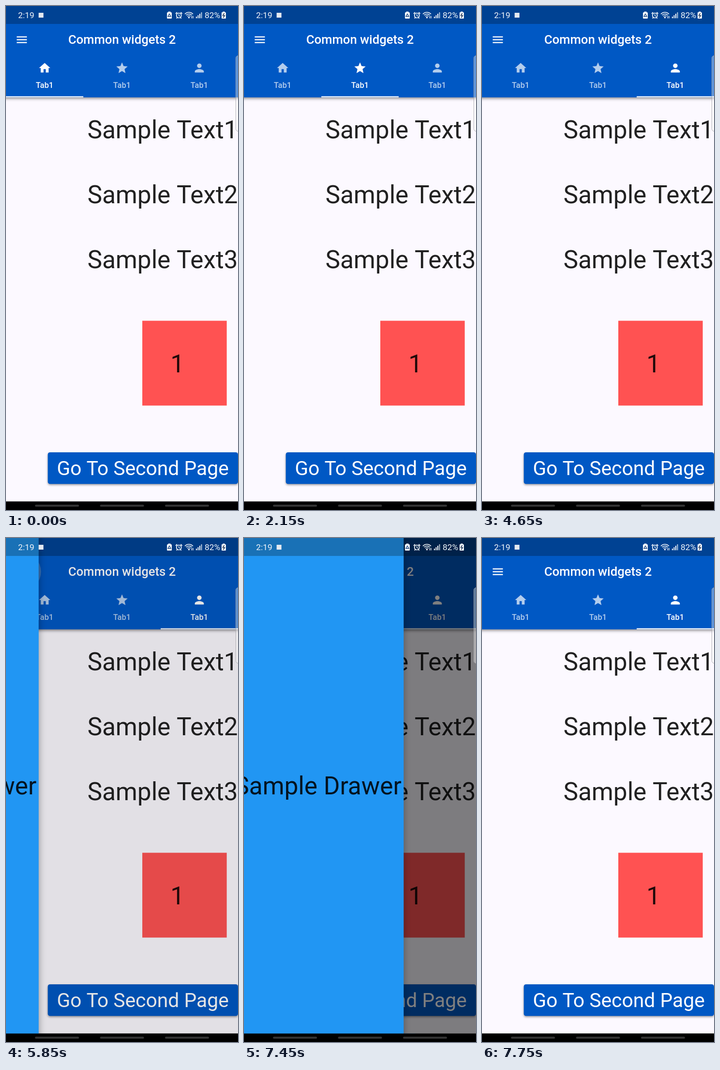
An HTML page with a canvas for the animation above (8 s loop, 480 by 1040 pixels).

```html
<!DOCTYPE html>
<html lang="en">
<head>
<meta charset="utf-8">
<title>Common widgets 2</title>
<style>
html, body { margin: 0; width: 100%; height: 100%; overflow: hidden; background: #000; }
canvas { display: block; width: 480px; height: 1040px; }
</style>
</head>
<body>
<canvas id="stage" width="480" height="1040"></canvas>
<script>
const ctx = document.getElementById('stage').getContext('2d');
const W = 480, LOOP = 8000, STEP = 50;
const DP = 480 / 411.43;
const BAR = 188.6, NAV = 1022.5, DRAWER = 304 * DP;
const BLUE = '#0058c4', INK = 'rgba(0,0,0,.87)', BIG = 44 * DP;

const ICONS = [
  'M10 20v-6h4v6h5v-8h3L12 3 2 12h3v8z',
  'M12 17.27L18.18 21l-1.64-7.03L22 9.24l-7.19-.61L12 2 9.19 8.63 2 9.24l5.46 4.73L5.82 21z',
  'M12 12c2.21 0 4-1.79 4-4s-1.79-4-4-4-4 1.79-4 4 1.79 4 4 4zm0 2c-2.67 0-8 1.34-8 4v2h16v-2c0-2.66-5.33-4-8-4z'
].map(d => new Path2D(d));

const clamp = (v, a = 0, b = 1) => Math.min(b, Math.max(a, v));
const white = a => `rgba(255,255,255,${a})`;

function rect(x, y, w, h, fill, r = 0) {
  ctx.fillStyle = fill;
  ctx.beginPath();
  ctx.roundRect(x, y, w, h, r);
  ctx.fill();
}

function disc(x, y, r, fill) {
  ctx.fillStyle = fill;
  ctx.beginPath();
  ctx.arc(x, y, r, 0, 7);
  ctx.fill();
}

function line(points, color, width) {
  ctx.strokeStyle = color;
  ctx.lineWidth = width;
  ctx.beginPath();
  points.forEach(([x, y], i) => i ? ctx.lineTo(x, y) : ctx.moveTo(x, y));
  ctx.stroke();
}

function text(str, x, y, size, fill, weight = 400, align = 'left') {
  ctx.font = `${weight} ${size}px Roboto, sans-serif`;
  ctx.textAlign = align;
  ctx.fillStyle = fill;
  ctx.fillText(str, x, y);
}

function shadowed(alpha, blur, dy, draw) {
  ctx.save();
  ctx.shadowColor = `rgba(0,0,0,${alpha})`;
  ctx.shadowBlur = blur;
  ctx.shadowOffsetY = dy;
  draw();
  ctx.restore();
}

// cubic-bezier(.25, .1, .25, 1), solved by bisection
function ease(x) {
  if (x <= 0 || x >= 1) return clamp(x);
  const curve = (a, b, s) => 3 * a * s * (1 - s) ** 2 + 3 * b * s * s * (1 - s) + s ** 3;
  let lo = 0, hi = 1;
  for (let i = 0; i < 24; i++) {
    const mid = (lo + hi) / 2;
    if (curve(.25, .25, mid) < x) lo = mid; else hi = mid;
  }
  return curve(.1, 1, lo);
}

// Critically damped spring falling from 1 to just below 0
function spring(ms) {
  const w = Math.sqrt(500), s = ms / 1000;
  return clamp((1.01 + (1.01 * w - 1) * s) * Math.exp(-w * s) - .01);
}

const tabAt = t => ease((t - 1740) / 340) + ease((t - 3440) / 340);

function drawerAt(t) {
  if (t < 5850) return 0;
  if (t < 7450) return 1 - spring(33.5 + (t - 5850) * 1.17);
  return spring(17 + (t - 7450) * 1.17);
}

function content() {
  rect(0, 0, W, NAV, '#fcf9ff');
  [273, 407, 540.5].forEach((y, i) => text('Sample Text' + (i + 1), 168.4, y, BIG, INK));
  rect(282, 649.5, 174.7, 175, '#ff5252');
  text('1', 340.3, 755.5, BIG, INK);
  shadowed(.4, 4, 2, () => rect(86.5, 921, 393.5, 65.3, BLUE, 4.67));
  text('Go To Second Page', 105.2, 967.7, 35 * DP, '#fff');
}

function ripple(index, age) {
  if (age < 0 || age >= 300) return;
  ctx.save();
  ctx.beginPath();
  ctx.rect(index * 160, 102.5, 160, BAR - 102.5);
  ctx.clip();
  disc(index * 160 + 80, 145, 30 + age * .6, `rgba(200,200,200,${.22 * (1 - age / 300)})`);
  ctx.restore();
}

function appBar(t) {
  shadowed(.45, 6, 2, () => rect(-10, 0, W + 20, BAR, BLUE));
  if (t >= 5850 && t < 6050) disc(32.5, 69.5, 40, 'rgba(200,200,200,.3)');
  for (const dy of [-5.83, 0, 5.83]) rect(22.2, 69.6 + dy - 1.17, 21, 2.33, '#fff');
  text('Common widgets 2', 240, 78, 22 * DP, '#fff', 500, 'center');

  ripple(1, t - 1750);
  ripple(2, t - 3450);
  const pos = tabAt(t);
  ICONS.forEach((icon, i) => {
    const color = white(.7 + .3 * clamp(1 - Math.abs(pos - i)));
    const x = 80 + i * 160;
    ctx.save();
    ctx.translate(x - 14, 114);
    ctx.scale(DP, DP);
    ctx.fillStyle = color;
    ctx.fill(icon);
    ctx.restore();
    ctx.letterSpacing = '.12px';
    text('Tab1', x, 169.3, 14 * DP, color, 500, 'center');
    ctx.letterSpacing = '0px';
  });
  rect(pos * 160, BAR - 2.33, 160, 2.33, '#fff');
}

function drawer(open) {
  if (open <= 0) return;
  rect(0, 0, W, NAV, `rgba(0,0,0,${.54 * open})`);
  const x = (open - 1) * DRAWER;
  shadowed(.35, 14, 4, () => rect(x, -20, DRAWER, NAV + 40, '#2196f3'));
  text('Sample Drawer', x + DRAWER / 2, 529, BIG, INK, 400, 'center');
}

function statusBar() {
  rect(0, 0, W, 37, 'rgba(0,0,0,.25)');
  const c = '#f4f7fb';
  text('2:19', 25, 25.3, 17.4, c);
  rect(67.5, 14, 10, 10, '#e4e9f0');

  // Battery saver
  rect(335.5, 11.5, 5, 2.5, c);
  rect(333, 13, 10, 13, c, 1.5);
  line([[338, 16], [341, 21.5], [335, 21.5], [338, 16]], '#17407c', 1.3);

  // Alarm
  ctx.strokeStyle = c;
  ctx.lineWidth = 1.7;
  ctx.beginPath();
  ctx.arc(357.7, 19.5, 5, 0, 7);
  ctx.stroke();
  line([[357.7, 16.5], [357.7, 20], [360, 21.2]], c, 1.3);
  line([[351, 16], [354, 13]], c, 1.8);
  line([[364.4, 16], [361.4, 13]], c, 1.8);
  line([[354.5, 23.5], [352.8, 25.8]], c, 1.6);
  line([[360.9, 23.5], [362.6, 25.8]], c, 1.6);

  // Wi-Fi
  ctx.lineWidth = 1.6;
  for (const r of [4.5, 8, 11.5]) {
    ctx.beginPath();
    ctx.arc(378.5, 24.5, r, -Math.PI * .76, -Math.PI * .24);
    ctx.stroke();
  }
  disc(378.5, 23.7, 1.7, c);
  line([[384.3, 20.5], [384.3, 25.5]], c, 1.3);
  line([[387, 20.5], [387, 25.5]], c, 1.3);

  // Signal
  for (let i = 0; i < 4; i++) rect(393 + i * 3.5, 22 - i * 3, 2, 3.3 + i * 3, i < 3 ? c : white(.75));

  text('82%', 411, 25.3, 17.4, c);

  // Charging battery
  rect(448.3, 11.5, 4.4, 2.5, c);
  rect(446, 13, 9, 13, c, 1.3);
  line([[451.7, 15], [448.6, 19.6], [452.4, 19.6], [449.4, 24]], '#14294a', 1.4);
}

function systemChrome() {
  ctx.beginPath();
  ctx.roundRect(475.5, 102.5, 12, 156, 5);
  ctx.fillStyle = white(.36);
  ctx.fill();
  ctx.strokeStyle = 'rgba(165,165,170,.85)';
  ctx.lineWidth = 1;
  ctx.stroke();
  rect(0, NAV, W, 1040 - NAV, '#000');
  for (const x of [60, 194.5, 329]) rect(x, 1029, 91, 4.3, '#333', 2.1);
}

function draw(t) {
  content();
  appBar(t);
  drawer(drawerAt(t));
  statusBar();
  systemChrome();
}

const start = performance.now();
function tick() {
  const t = (performance.now() - start) % LOOP;
  draw(Math.floor(t / STEP) * STEP);
  requestAnimationFrame(tick);
}
tick();
</script>
</body>
</html>
```
